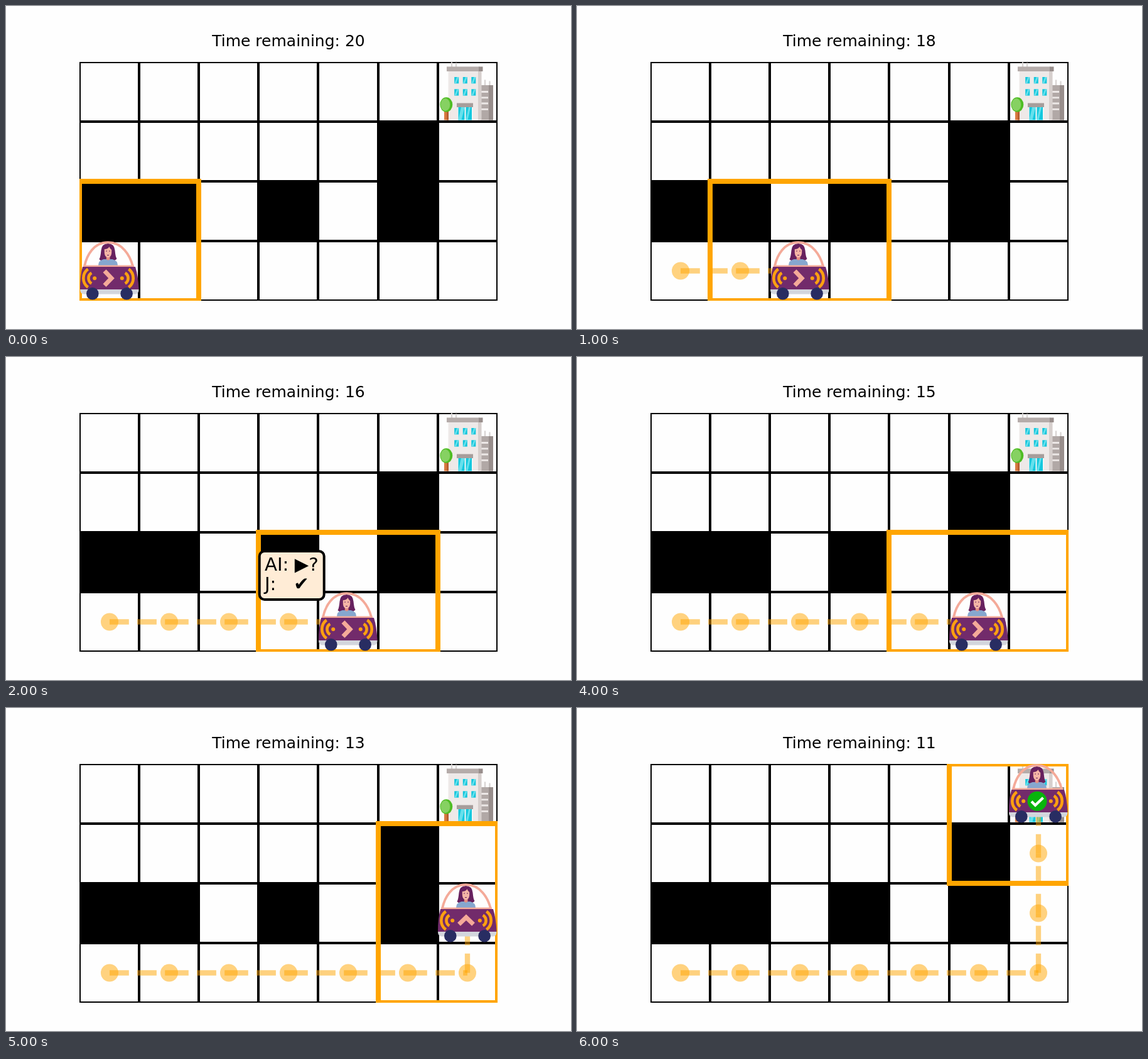
These frames come from a looping animation (900x514 px, 8 s). An HTML page:

```html
<!DOCTYPE html>
<html lang="en">
<head>
<meta charset="utf-8">
<title>Grid drive</title>
<style>
  html, body { margin: 0; width: 100%; height: 100%; overflow: hidden; background: #fefefe; }
  svg { display: block; width: 100vw; height: 100vh; }
  text { font-family: "DejaVu Sans", Verdana, sans-serif; white-space: pre; }
</style>
</head>
<body>
<svg viewBox="0 0 900 514">
  <defs>
    <clipPath id="area"><rect x="117" y="89" width="666" height="380"/></clipPath>
    <g id="signal" fill="none" stroke="#ffa010" stroke-width="4.6">
      <circle r="3" fill="#ffa010" stroke="none"/>
      <path d="M-4.9 -8.4A9.7 9.7 0 0 0 -4.9 8.4"/>
      <path d="M-10.6 -14.5A18 18 0 0 0 -10.6 14.5"/>
    </g>
  </defs>

  <text id="title" x="450" y="64" font-size="25" text-anchor="middle"></text>

  <g clip-path="url(#area)">
    <g id="walls"></g>
    <g id="grid" stroke="#000" stroke-width="4"></g>
  </g>

  <g id="building">
    <path d="M710 97V90.5M717 97V91.5M763 127V118.5M770.5 127V120.5" stroke="#d9d5d4" stroke-width="2.4" stroke-linecap="round"/>
    <path d="M756 126h20v55.5h-20z" fill="#b1a8a6"/>
    <path d="M769 126h7v55.5h-7z" fill="#988e8c"/>
    <path d="M757 136.5h11M757 145.8h11M757 155h11M757 164.3h11" stroke="#ece7e6" stroke-width="2.8"/>
    <path d="M704.500 103h48.500v78.500h-48.500z" fill="#eee9e8"/>
    <path d="M752 103h5.500v78.500h-5.500z" fill="#d6cfcd"/>
    <path d="M702 96.500h52v7.500h-52z" fill="#b5acaa"/>
    <path d="M753 96.500h6.500v7.500h-6.500z" fill="#988e8c"/>
    <g id="windows"></g>
    <path d="M719.500 161h24v20.500h-24z" fill="#f8f7f7"/>
    <path d="M720.500 161h10v20.500h-10zM732.500 161h9.500v20.500h-9.500z" fill="#14c8de"/>
    <path d="M725 161h5.500l-5 20.500h-5zM737 161h3l-4.500 20.500h-3z" fill="#66e0ec"/>
    <path d="M718 154.500h26v6.500h-26z" fill="#a79d9b"/>
    <path d="M698 166h7v15.500h-7z" fill="#d9793f"/>
    <path d="M702 166h3v15.500h-3z" fill="#b45f30"/>
    <ellipse cx="701.300" cy="157" rx="10" ry="11.700" fill="#4fbd24"/>
    <ellipse cx="699.800" cy="157" rx="7.500" ry="10" fill="#86d162"/>
  </g>

  <g id="trail" clip-path="url(#area)" fill="#ffa500" stroke="#ffa500"></g>
  <g clip-path="url(#area)">
    <rect id="view" fill="none" stroke="#ffa500" stroke-width="8"/>
  </g>

  <g id="car">
    <path d="M31 29Q33 26 34 15Q35 4 45 4Q55 4 56 15Q57 26 59 28Q56 32 51 31H38Q33 32 31 29Z" fill="#67215f"/>
    <path d="M29.500 39Q29.500 31 38 29H52Q60.500 31 60.500 39Z" fill="#86a7cf"/>
    <path d="M42.300 22h5.700v7q-2.800 3.500 -5.700 0z" fill="#e58f83"/>
    <path d="M39.300 13Q45 13 47 9Q48 12 50.700 14V19Q50 26 45 26.500Q40 26 39.300 19Z" fill="#f5b5a6"/>
    <path d="M41.500 16h2M46.500 16h2M43.500 22.500h3" stroke="#67215f" stroke-width="1"/>
    <path d="M7.500 40C11 23 22 2.200 45 2.200S80 23 84.500 40" fill="none" stroke="#f4aa99" stroke-width="3.800"/>
    <path d="M5.500 38.500H86.500V41.500H5.500Z" fill="#f4aa99"/>
    <path d="M4.500 41H88.500Q93 55 94 77H.5Q.5 55 4.500 41Z" fill="#722b6b"/>
    <path d="M.5 77H94Q94 84 89 84.500H6Q.5 84 .5 77Z" fill="#d3d6dd"/>
    <circle cx="20.300" cy="83.700" r="9.800" fill="#282d62"/>
    <circle cx="74.600" cy="83.700" r="9.800" fill="#282d62"/>
    <use href="#signal" x="23.700" y="59.200"/>
    <use href="#signal" transform="translate(67.300 59.200) scale(-1 1)"/>
    <path id="arrow" d="M-6 -11.500L5 0L-6 11.500" fill="none" stroke="#f4aa99" stroke-width="7"/>
    <g id="done" transform="translate(45.500 59.300)">
      <circle r="15.500" fill="#08b50c"/>
      <path d="M-9 .5L-3 6.500L9.500 -5.500" fill="none" stroke="#fff" stroke-width="4.200"/>
    </g>
  </g>

  <g id="dialog" font-size="29.200">
    <rect x="403.700" y="309" width="103" height="77" rx="8" fill="#ffecd6" stroke="#000" stroke-width="4"/>
    <text x="412" y="340">AI: ▶?</text>
    <text x="412" y="371">J:   ✔</text>
  </g>
</svg>
<script>
const LOOP = 8000, STEP = 500, PAUSE_STEP = 4, PAUSE_END = 4000;
const COLS = 7, ROWS = 4, CELL = 95;
const WALLS = [[5, 1], [0, 2], [1, 2], [3, 2], [5, 2]];
const ROUTE = [];
for (let c = 0; c < COLS; c++) ROUTE.push([c, ROWS - 1]);
for (let r = ROWS - 2; r >= 0; r--) ROUTE.push([COLS - 1, r]);
const LAST = ROUTE.length - 1;

const $ = id => document.getElementById(id);
const colX = c => Math.round(117 + 95.12 * c);
const rowY = r => 89 + CELL * r;
const center = ([c, r]) => [165 + CELL * c, 136.5 + CELL * r];

function set(el, attrs) {
  for (const key in attrs) el.setAttribute(key, attrs[key]);
  return el;
}
function add(parent, tag, attrs) {
  const el = document.createElementNS("http://www.w3.org/2000/svg", tag);
  return parent.appendChild(set(el, attrs));
}
const show = (el, on) => set(el, { visibility: on ? "visible" : "hidden" });

// Rectangle spanning columns c0..c1 and rows r0..r1
const span = (c0, r0, c1, r1) => ({
  x: colX(c0), y: rowY(r0), width: colX(c1) - colX(c0), height: rowY(r1) - rowY(r0)
});

for (const [c, r] of WALLS) add($("walls"), "rect", span(c, r, c + 1, r + 1));
for (let c = 0; c <= COLS; c++) add($("grid"), "path", { d: `M${colX(c)} 89V469` });
for (let r = 0; r <= ROWS; r++) add($("grid"), "path", { d: `M117 ${rowY(r)}H783` });

for (const y of [113, 132.3]) {
  for (const x of [714.2, 727.8, 741.3]) {
    add($("windows"), "rect", { x, y, width: 7, height: 10.3, fill: "#12c6dc" });
    add($("windows"), "path", { d: `M${x + 4} ${y}h3l-4 10.300h-3z`, fill: "#66e0ec" });
  }
}

const legs = ROUTE.slice(0, LAST).map((cell, i) => {
  const [x, y] = center(cell), [x2, y2] = center(ROUTE[i + 1]);
  const leg = add($("trail"), "g", {});
  add(leg, "circle", { cx: x, cy: y, r: 14, stroke: "none", opacity: 0.5 });
  add(leg, "path", {
    d: `M${x} ${y}L${x2} ${y2}`, "stroke-width": 8.3, "stroke-dasharray": "30.8 13.3", opacity: 0.5
  });
  return leg;
});

function stepAt(t) {
  const n = Math.floor(t / STEP);
  return t < PAUSE_END ? Math.min(PAUSE_STEP, n) : Math.min(LAST, n - 3);
}

function draw(t) {
  const step = stepAt(t);
  const [c, r] = ROUTE[step];
  $("title").textContent = "Time remaining: " + (20 - step);
  legs.forEach((leg, i) => show(leg, i < step));
  set($("view"), span(Math.max(0, c - 1), Math.max(0, r - 1),
    Math.min(COLS, c + 2), Math.min(ROWS, r + 2)));
  set($("car"), { transform: `translate(${117.5 + CELL * c} ${rowY(r)})` });
  const turn = step < COLS - 1 ? 0 : -90;
  set($("arrow"), { transform: `translate(45.500 59.200) rotate(${turn})` });
  show($("arrow"), step < LAST);
  show($("done"), step === LAST);
  show($("dialog"), step === PAUSE_STEP);
}

let start;
function tick(now) {
  start ??= now;
  draw((now - start) % LOOP);
  requestAnimationFrame(tick);
}
draw(0);
requestAnimationFrame(tick);
</script>
</body>
</html>
```
